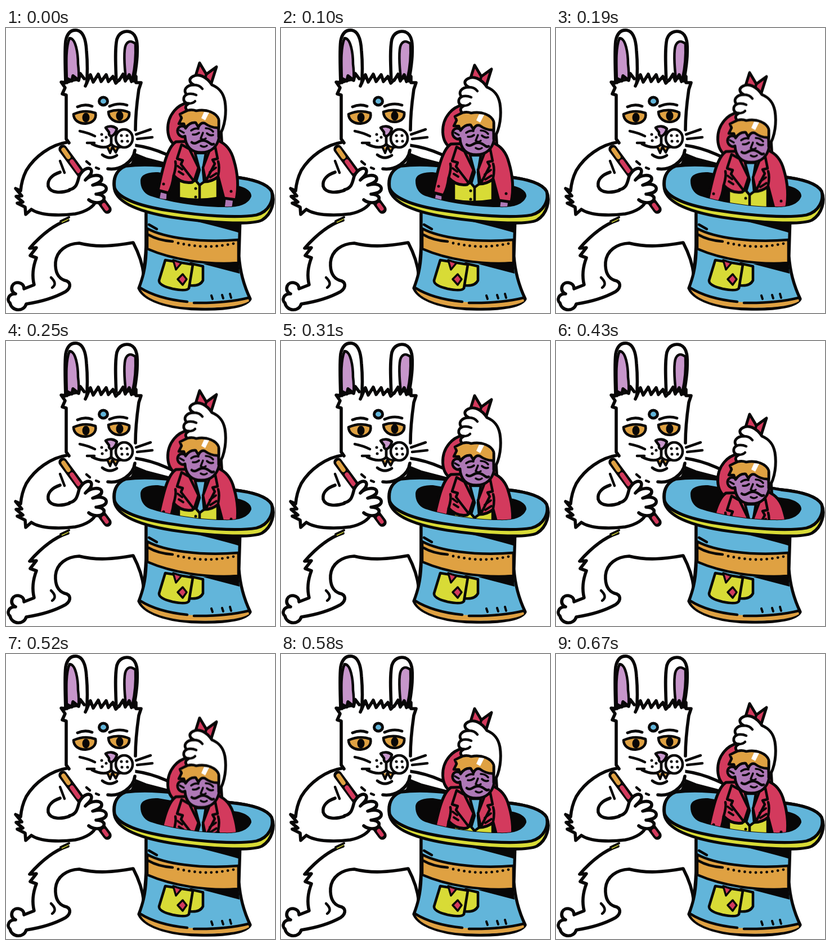
An HTML page that plays this animation: 478x506 px, repeating every 700 ms.

```html
<!DOCTYPE html>
<html lang="en">
<head>
<meta charset="utf-8">
<title>Rabbit and hat</title>
<style>
html, body { margin: 0; width: 100%; height: 100%; overflow: hidden; background: #fff; }
svg { display: block; width: 100vw; height: 100vh; }
path, circle, ellipse { stroke-linecap: round; stroke-linejoin: round; }
</style>
</head>
<body>
<svg id="stage" viewBox="0 0 478 506">
  <defs>
    <clipPath id="opening">
      <path d="M180 0H478V300L436 300C428 314 410 318 386 317C340 317 285 307 256 297L180 270Z"/>
    </clipPath>
  </defs>
  <g id="rabbit"></g>
  <g id="hat"></g>
  <g clip-path="url(#opening)"><g id="man"></g></g>
</svg>
<script>
const INK = '#080707', WHITE = '#fff', BLUE = '#62b5da', RED = '#d33a5d',
      YELLOW = '#d8db36', ORANGE = '#dfa142', PINK = '#c796cb', SKIN = '#ae78b6';

function painter(id, weight) {
  const layer = document.getElementById(id);
  const add = (tag, attrs) => {
    const el = document.createElementNS('http://www.w3.org/2000/svg', tag);
    for (const k in attrs) el.setAttribute(k, attrs[k]);
    layer.append(el);
  };
  return {
    shape: (d, fill, w = weight) => add('path', { d, fill, stroke: INK, 'stroke-width': w }),
    flat: (d, fill) => add('path', { d, fill }),
    line: (d, w = weight, stroke = INK) => add('path', { d, fill: 'none', stroke, 'stroke-width': w }),
    oval: (cx, cy, rx, ry, fill, w = 0) =>
      add('ellipse', { cx, cy, rx, ry, fill, stroke: INK, 'stroke-width': w }),
    dots: (points, r) => points.forEach(([cx, cy]) => add('circle', { cx, cy, r, fill: INK }))
  };
}

function drawRabbit({ shape, flat, line, oval, dots }) {
  // far arm and its shadow
  line('M228 208C250 211 266 216 284 224L302 232');
  flat('M203 249L222 240L230 222L250 230L304 244L300 250L235 246Z', INK);

  // leg and body
  shape('M110 341C85 349 64 366 42 391L54 390L43 404L54 408C47 426 46 440 50 456L32 463'
    + 'C32 450 15 449 11 458C8 466 13 470 17 472C4 471 1 484 7 488C10 503 31 505 36 490'
    + 'C62 486 88 478 106 468C117 460 115 450 104 448C93 444 87 434 88 416C90 395 108 383 130 382'
    + 'C162 390 192 387 226 381C236 400 243 420 245 440', 'none');
  line('M249 330V386C248 410 246 426 243 446');
  line('M80 443Q92 454 82 461', 4.5);
  line('M100 344L110 339', 3, YELLOW);
  line('M97 343L112 336', 4);

  // near arm
  line('M108 203C80 207 51 228 36 253C30 265 27 277 26 289L17 285L28 298L18 299L30 309L20 311L34 318L35 331L45 322'
    + 'C62 334 100 333 123 330C143 326 156 317 160 307');
  line('M96 256C84 260 73 268 75 281C79 294 99 293 113 288');
  line('M96 236L104 257', 4.5);
  line('M101 215L180 322', 15.5);
  line('M102 216L111 229', 7.5, ORANGE);
  line('M117 237L129 254', 7.5, RED);
  line('M174 314L179 321', 7, RED);
  flat('M127 263L152 254L176 283L173 304L150 310L112 296Z', WHITE);
  shape('M113 287C126 284 127 274 130 263C138 247 151 246 152 254C152 262 145 264 141 270'
    + 'C150 260 169 259 170 267C171 274 161 276 154 279C170 274 180 280 178 287'
    + 'C176 293 166 294 160 295C171 295 177 300 173 306C168 312 154 311 147 305', WHITE);

  // ears
  shape('M106 98C105 70 104 40 106 23C109 7 117 3 126 4C138 6 142 22 143 40C145 62 145 82 143 104', WHITE);
  shape('M108 92C107 60 106 34 113 18C124 18 128 45 128 64Q130 80 129 92Q118 92 109 97Z', PINK, 4.5);
  shape('M196 96C195 70 193 38 197 20C201 8 211 4 221 7C234 12 234 30 233 50C232 68 229 82 227 96', WHITE);
  shape('M213 90C210 65 209 38 213 30Q219 19 230 28C231 53 228 75 225 88Z', PINK, 4.5);

  // head
  flat('M106 98L144 100L193 92L236 98L230 180L229 228L184 250L108 198Z', WHITE);
  line('M141 103L150 83L155 96L164 82L169 95L178 83L182 95L190 86L195 98L201 92');
  line('M201 93L208 82L212 94L219 83L223 95L231 86L231 97L240 97L236 109C233 130 230 150 230 181');
  line('M139 90L132 81L129 93L119 85L117 94L107 89L108 97L98 96L105 106L100 117L107 119V197L112 204');

  oval(173, 130, 7.5, 7, BLUE, 5);
  line('M127 140Q140 134 153 139', 4.8);
  line('M184 139Q200 132 215 137', 4.8);
  shape('M120 153Q140 144 159 151C164 175 120 176 120 153Z', ORANGE, 4.6);
  oval(142, 159, 6.5, 8.5, INK);
  shape('M182 149Q201 142 219 150C222 172 183 173 182 149Z', ORANGE, 4.6);
  oval(202, 156, 6.5, 8.5, INK);

  oval(210, 196, 15, 16, WHITE, 4.6);
  line('M187 190V206C181 214 167 213 153 206M187 206Q194 214 204 211', 4.8);
  shape('M180 211L185 222L189 211L195 221L199 213', ORANGE, 4);
  shape('M177 177C183 173 192 174 197 179Q195 188 188 192Q182 192 183 185Z', PINK, 4.6);
  dots([[170, 189], [178, 194], [171, 200], [205, 191], [215, 191], [206, 201], [216, 201]], 2.5);
  line('M131 183Q146 186 158 192M144 204H157', 4.5);
  line('M231 189L257 180M233 197L260 194', 4.5);
  line('M171 225Q184 235 197 226', 4.8);
  line('M181 250C202 253 226 239 229 217');
  line('M143 237L149 242M160 248L165 250', 4.5);
}

function drawHat({ shape, flat, line, dots }) {
  // crown
  shape('M249 322V398C248 428 242 446 236 462C247 487 300 499 348 499C396 500 428 493 434 481'
    + 'C424 460 416 435 414 405L416 340Z', BLUE);
  flat('M290 332L416 342V364Q372 351 290 332Z', INK);
  line('M254 349L268 357', 4.5);
  shape('M251 356C280 372 345 382 413 376V417C355 421 295 411 251 392Z', ORANGE, 4.5);
  line('M253 367Q270 377 296 379', 4.5);
  for (let i = 0; i < 11; i++) dots([[306 + i * 9.8, 382 + 6 * Math.sin(i * .3)]], 2.4);
  flat('M350 419L413 415L415 436Z', INK);

  // cards
  shape('M328 418L350 423L350 448Q345 459 326 457Z', YELLOW, 4.6);
  shape('M283 412L272 448Q271 457 296 463Q321 468 325 462L332 420Z', YELLOW, 4.6);
  shape('M297 412L312 417L302 429Z', RED, 3.5);
  shape('M314 437L321 446L314 456L305 446Z', RED, 3.5);

  // hem
  flat('M239 464C270 480 320 490 360 486Q400 484 430 478L432 485C412 498 350 498 310 495Q252 487 239 464Z', ORANGE);
  line('M238 461Q270 481 322 486M334 488Q390 489 431 479', 4.5);
  line('M365 475L367 481M384 474L386 480M398 472L400 479', 4);

  // brim
  shape('M213 245C240 242 270 243 300 247L400 264C440 268 464 276 472 290C479 306 473 330 455 341'
    + 'C435 351 355 345 295 336C240 327 193 311 192 281C190 262 200 250 213 245Z', YELLOW);
  shape('M213 245C240 242 270 243 300 247L400 264C440 268 464 276 472 290C476 305 468 326 445 332'
    + 'C410 338 345 333 288 324C238 316 200 303 193 284C190 262 200 250 213 245Z', BLUE);
  flat('M239 272C239 261 249 256 270 256L405 279C425 281 437 290 436 299C430 315 410 319 386 318'
    + 'C340 318 285 308 256 298C244 293 239 283 239 272Z', INK);
}

function drawMan({ shape, flat, line, dots }) {
  // pulled-up coat
  shape('M303 210C283 198 283 166 299 147Q308 136 324 132L380 150L384 210Z', RED);
  shape('M334 94L344 62L356 82L374 69L363 104Z', RED);
  line('M356 82L352 96', 4.5);

  // hands and vest
  shape('M274 286L270 306H287L288 288Z', SKIN, 4.5);
  shape('M389 298L386 322H403L406 302Z', SKIN, 4.5);
  shape('M307 268V302Q340 308 376 302V262Z', YELLOW, 4.5);

  // coat and sleeves
  shape('M302 202C287 211 279 246 270 288L289 293Q296 280 298 262Q312 277 331 274L344 251L352 273'
    + 'Q366 273 377 264L387 302L409 305C414 280 411 255 405 235Q398 208 377 200Z', RED);
  shape('M336 222L344 252L338 272L344 279L352 273L350 252L355 222Z', BLUE, 4.5);
  line('M344 279V304', 4.5);
  dots([[337, 285], [337, 300], [280, 277], [400, 290]], 2.5);
  line('M298 262Q303 245 301 237M377 262Q380 247 377 237', 4.5);
  shape('M312 207L304 232L314 235L311 242L334 272L342 248L326 215Z', RED, 4.5);
  shape('M372 212L376 232L367 234L371 241L355 272L350 248L362 217Z', RED, 4.5);
  line('M305 245L313 251M307 255L315 260M362 256L373 248M363 265L374 258', 4);

  // head
  shape('M317 175C305 171 301 185 309 191Q314 195 318 192C319 211 330 221 347 221'
    + 'C366 221 376 209 379 193L377 168L325 162Z', SKIN, 4.8);
  line('M309 182L316 186', 3.5);
  line('M329 182Q336 177 342 179M355 178Q363 178 368 184', 3.6);
  line('M332 189Q338 190 343 186M357 187Q363 192 368 190', 3.6);
  line('M350 186L346 196Q350 200 355 196', 3.5);
  line('M330 203C336 208 341 201 347 200Q352 199 356 201C362 203 364 209 369 206', 4.5);
  line('M346 209Q352 213 357 209', 3.5);

  // gripping paw
  shape('M332 86C323 91 327 98 334 101C320 101 314 111 321 118C313 122 314 134 325 134'
    + 'C315 139 319 149 330 147L378 164V193C390 175 392 149 389 130C386 114 378 106 366 101'
    + 'C356 86 342 80 332 86Z', WHITE);
  line('M334 101Q344 101 349 108M321 118Q329 115 338 119M325 134Q332 134 336 130', 4.5);

  // hair
  shape('M307 170L312 160L309 153L317 149Q327 143 338 147C357 143 374 151 378 162V177'
    + 'Q365 178 353 169Q346 167 342 176L337 168Q326 167 319 178L316 170Z', ORANGE, 4.6);
  flat('M352 149L361 150L354 164L347 160Z', WHITE);
}

drawRabbit(painter('rabbit', 5.6));
drawHat(painter('hat', 5.3));
drawMan(painter('man', 5));

// drop of the man in pixels: [ms, y], sampled every 30 ms
const LOOP = 700, STEP = 30, HOLD = 100;
const knots = [[100, 4], [310, 35], [430, 68], [460, 68], [580, 35], [670, 26]];

function dropAt(t) {
  if (t < HOLD) return 0;
  const q = HOLD + Math.floor((t - HOLD) / STEP) * STEP;
  const i = Math.max(1, knots.findIndex(k => k[0] >= q));
  const [t0, y0] = knots[i - 1], [t1, y1] = knots[i];
  return y0 + (y1 - y0) * (q - t0) / (t1 - t0);
}

const frames = [];
for (let t = 0; t < LOOP; t = t < HOLD ? HOLD : t + STEP)
  frames.push({ offset: t / LOOP, transform: `translateY(${dropAt(t)}px)`, easing: 'step-end' });
frames.push({ ...frames[frames.length - 1], offset: 1 });

document.getElementById('man').animate(frames, { duration: LOOP, iterations: Infinity });
</script>
</body>
</html>
```
